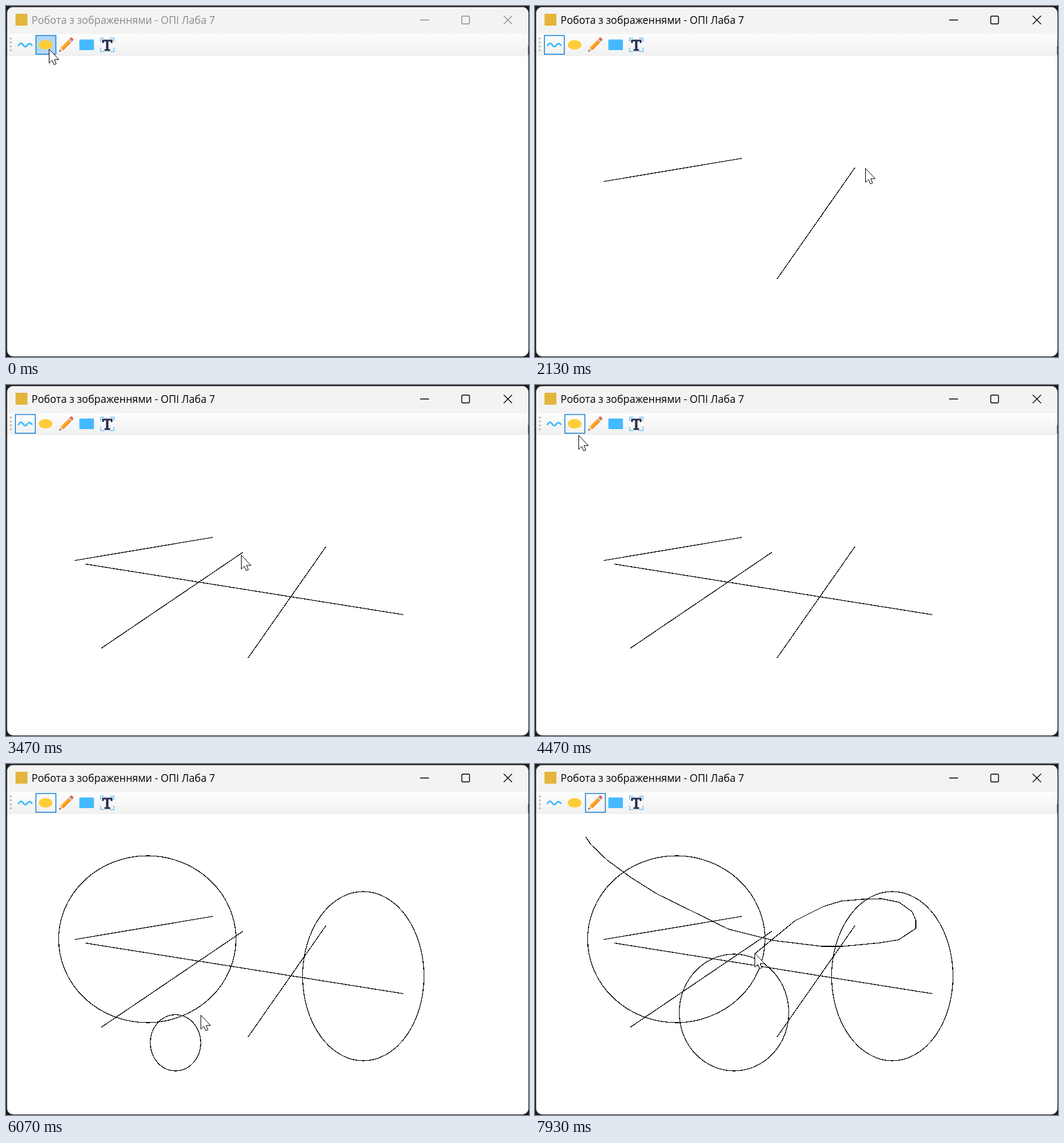
An HTML page for the animation above (8000 ms loop, 879 by 589 pixels).

```html
<!DOCTYPE html>
<html lang="uk">
<head>
<meta charset="utf-8">
<title>Paint window</title>
<style>
  html, body { margin: 0; width: 100%; height: 100%; overflow: hidden; background: #1c1c1c; }
  svg { display: block; width: 879px; height: 589px; }
  .title { font: 17.25px "Open Sans", "Noto Sans", sans-serif; }
  #drawing { fill: none; stroke: #000; stroke-width: 1.25; shape-rendering: crispEdges; }
</style>
</head>
<body>
<svg viewBox="0 0 879 589">
  <defs>
    <linearGradient id="bar" x2="0" y2="1">
      <stop stop-color="#fdfdfd"/><stop offset="1" stop-color="#f0f0f0"/>
    </linearGradient>
    <clipPath id="frame"><rect x="2" y="2" width="876" height="586" rx="10"/></clipPath>
  </defs>
  <rect width="879" height="589" fill="#1c1c1c"/>
  <rect x=".5" y=".5" width="878" height="588" rx="11" fill="#343434"/>
  <g clip-path="url(#frame)">
    <rect width="879" height="589" fill="#fff"/>
    <rect width="879" height="47" fill="#f3f3f3"/>
    <rect y="47" width="879" height="37" fill="url(#bar)"/>
    <rect x="877" y="67" width="1" height="15" fill="#8a8a8a"/>
  </g>
  <rect x="16" y="13" width="20" height="20" fill="#e3b53c"/>
  <g id="caption">
    <text class="title" x="43" y="30" fill="currentColor">Робота з зображеннями - ОПІ Лаба 7</text>
    <g fill="none" stroke="currentColor" stroke-width="1.4">
      <path d="M696 23.5H711M836.5 16.5l14 14M850.5 16.5l-14 14"/>
      <rect x="766" y="17" width="13" height="13" rx="2"/>
    </g>
  </g>
  <path d="M8 53V76" stroke="#b9b9b9" stroke-width="3" stroke-dasharray="3 3.6"/>
  <g id="buttons" stroke-width="1.5"></g>
  <path d="M21 66.5C24 61 27 62 29 65.5S34 69 36 65.5S41 62.5 43.5 66" fill="none" stroke="#43b9fd" stroke-width="2.6" stroke-linecap="round"/>
  <ellipse cx="66.5" cy="65.2" rx="11.5" ry="7.9" fill="#ffcd38"/>
  <g transform="translate(89.3 76.8) rotate(-45)">
    <path d="M0 0L7 -3.1V3.1Z" fill="#f2c99b"/>
    <path d="M0 0L3 -1.5V1.5Z" fill="#4b4650"/>
    <path d="M7 -3.1H25V3.1H7Z" fill="#ffa726"/>
    <path d="M7 1H25V3.1H7Z" fill="#f08a1d"/>
    <path d="M25 -3.1H28V3.1H25Z" fill="#b9c3cb"/>
    <path d="M28 -3.1H30.5Q32 -3.1 32 0T30.5 3.1H28Z" fill="#e8624f"/>
  </g>
  <rect x="123.3" y="56.3" width="24.5" height="17.6" rx="1.5" fill="#43b9ff"/>
  <path d="M159 60V54H165M175 54H181.5V60M181.5 70V76.5H175M165 76.5H159V70" fill="none" stroke="#72c6f8" stroke-width="1.6"/>
  <path d="M163 62V58H177.500V62M170.200 58V74M165.500 74H175" fill="none" stroke="#283457" stroke-width="3"/>
  <path d="M170.200 58V74" stroke="#283457" stroke-width="4"/>
  <g id="drawing"></g>
  <path id="cursor" d="M.5 .5V24L5.5 19.2L8.7 26.5L12.4 25L9.3 17.8H16.8Z" fill="#fff" stroke="#000"/>
</svg>
<script>
const LOOP = 8000, STEP = 200 / 3, PENCIL_DOWN = 7210;
const byId = id => document.getElementById(id);

// Press time, release time, start and end corners
const lines = [
  [1130, 1530, 115, 294, 348, 255],
  [1800, 2060, 406, 458, 537, 271],
  [2467, 2970, 668, 385, 133, 300],
  [3100, 3320, 160, 441, 398, 280]
];
const ovals = [
  [4600, 4950, 88, 154, 386, 434],
  [5400, 5730, 702, 214, 498, 498],
  [5950, 6200, 242, 515, 426, 319]
];

// Freehand stroke vertices
const stroke = [
  [85, 122], [94, 135], [121, 161], [162, 191], [205, 218], [325, 277], [400, 296],
  [482, 306], [517, 306], [580, 300], [611, 295], [640, 276], [640, 262], [634, 248],
  [612, 232], [582, 226], [550, 227], [515, 230], [485, 239], [437, 263], [370, 318]
];
const strokeTime = i => i < 15 ? PENCIL_DOWN + i * 42 : 7798 + (i - 14) * 21.5;

// Pointer positions between drags: time, x, y
const travel = [
  [0, 72, 72], [480, 42, 67], [600, 42, 68], [800, 48, 80], [867, 87, 164],
  [1060, 114, 290], [1733, 404, 451], [2133, 555, 272], [2330, 640, 345],
  [2600, 642, 380], [3030, 145, 380], [3400, 398, 280], [3467, 395, 285],
  [3600, 370, 300], [4270, 70, 70], [4440, 70, 70], [5200, 559, 300],
  [5830, 390, 521], [6733, 156, 123], [6930, 103, 72], [7080, 102, 72]
];

// The pointer sits slightly off the drawn points, more so further down.
const toTip = (x, y) => [x - 1, y - (y - 262) / 58];
const path = [
  ...travel,
  ...[...lines, ...ovals].flatMap(([down, up, x0, y0, x1, y1]) =>
    [[down, ...toTip(x0, y0)], [up, ...toTip(x1, y1)]]),
  ...stroke.map((p, i) => [strokeTime(i), ...toTip(...p)])
].sort((a, b) => a[0] - b[0]);
const clicks = [530, 4430, 7030];

function pointerAt(t) {
  const next = path.findIndex(p => p[0] > t);
  if (next < 0) return path.at(-1).slice(1);
  const [t0, x0, y0] = path[next - 1], [t1, x1, y1] = path[next];
  const k = (t - t0) / (t1 - t0);
  return [x0 + (x1 - x0) * k, y0 + (y1 - y0) * k];
}

const lineMarkup = (x0, y0, x1, y1) =>
  `<path d="M${x0 + .5} ${y0 + .5}L${x1 + .5} ${y1 + .5}"/>`;
const ovalMarkup = (x0, y0, x1, y1) =>
  `<ellipse cx="${(x0 + x1 + 1) / 2}" cy="${(y0 + y1) / 2}" rx="${Math.abs(x1 - x0) / 2}" ry="${Math.abs(y1 - y0) / 2}"/>`;

function drawingAt(t, tip) {
  const begun = (shapes, markup) => shapes.filter(s => t >= s[0])
    .map(([, up, x, y, ...end]) => markup(x, y, ...(t < up ? tip : end))).join("");
  let result = begun(lines, lineMarkup) + begun(ovals, ovalMarkup);
  if (t >= PENCIL_DOWN) {
    const points = stroke.filter((p, i) => strokeTime(i) <= t);
    if (points.length < stroke.length) points.push([tip[0] + 1, tip[1] + 1]);
    result += `<polyline points="${points.join(" ")}"/>`;
  }
  return result;
}

function buttonsAt(t, [x, y]) {
  const checked = clicks.filter(c => t >= c).length - 1;
  return [0, 1, 2].map(i => {
    const left = 15.8 + i * 34.5;
    const hover = x >= left && x < left + 34 && y > 48 && y < 82;
    if (!hover && i !== checked) return "";
    const fill = !hover ? "none" : i === checked ? "#80bceb" : "#b3d7f3";
    return `<rect x="${left}" y="49.5" width="33.5" height="31.5" fill="${fill}" stroke="#1680d8"/>`;
  }).join("");
}

function render(now) {
  const t = Math.floor((now % LOOP + 4) / STEP) * STEP % LOOP;
  const tip = pointerAt(t);
  byId("caption").setAttribute("color", t < clicks[0] ? "#8b8b8b" : "#000");
  byId("buttons").innerHTML = buttonsAt(t, tip);
  byId("drawing").innerHTML = drawingAt(t, tip);
  byId("cursor").setAttribute("transform", `translate(${tip.map(Math.round)})`);
}

let start;
function tick(now) {
  start ??= now;
  render(now - start);
  requestAnimationFrame(tick);
}
render(0);
requestAnimationFrame(tick);
</script>
</body>
</html>
```
